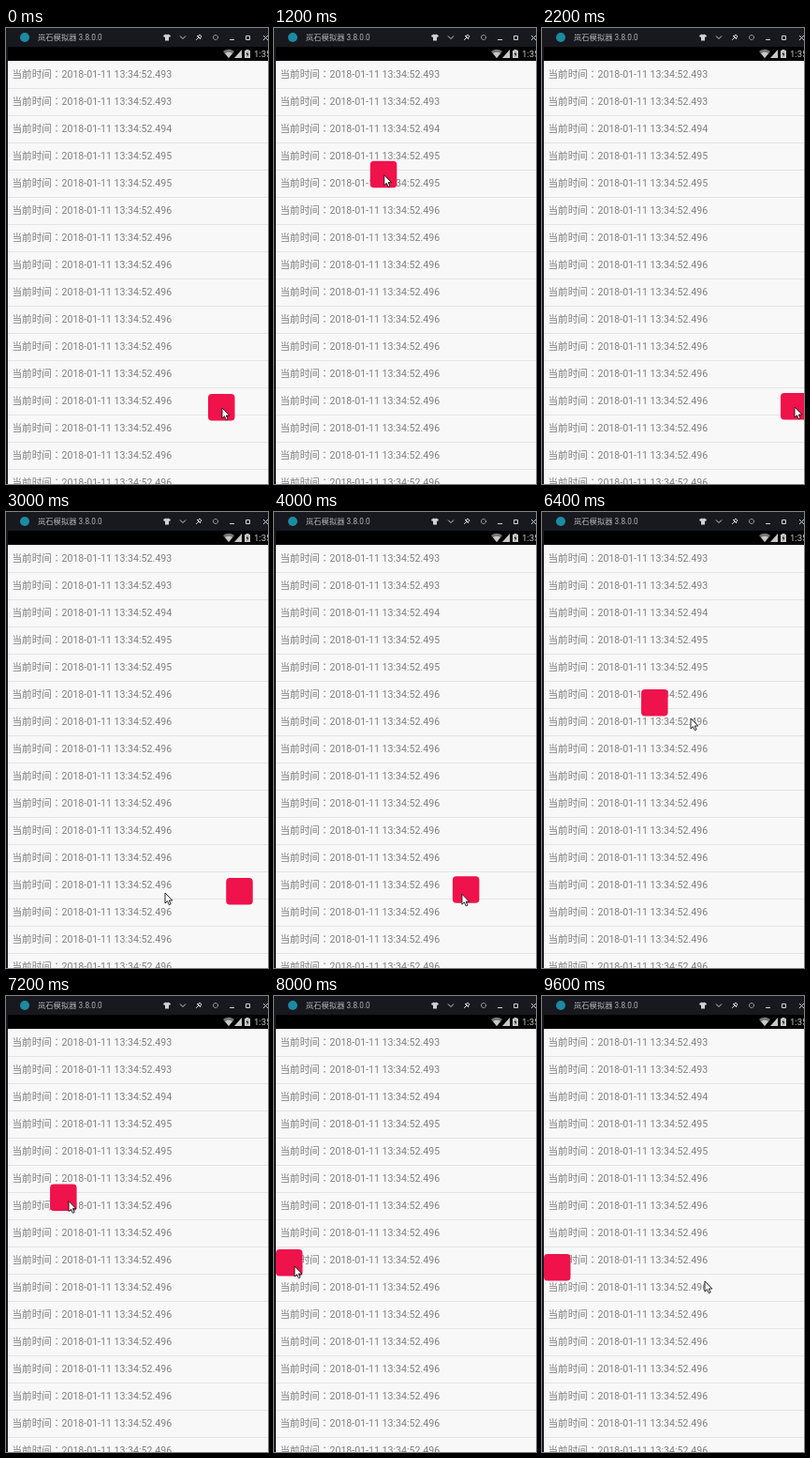
An HTML page that plays this animation: 280 px wide and 486 px high, repeating every 9800 ms.

```html
<!DOCTYPE html>
<html lang="zh-TW">
<head>
<meta charset="utf-8">
<style>
html, body { margin: 0; width: 100%; height: 100%; overflow: hidden; background: #f8f8f8; }
svg { display: block; font-family: Roboto, "Noto Sans CJK TC", "Noto Sans CJK", sans-serif; }
</style>
</head>
<body>
<svg width="280" height="486" viewBox="0 0 280 486">
  <rect width="280" height="486" fill="#f8f8f8"/>
  <g id="rows" font-size="10.6" fill="#7f7f7f"></g>
  <rect width="2" height="486" fill="#17191e"/>
  <rect width="280" height="20" fill="#17191e"/>
  <rect x="2" y="20" width="278" height="15" fill="#000"/>

  <!-- title bar -->
  <circle cx="20" cy="10" r="5" fill="#1b8ba3"/>
  <text x="34" y="13" font-size="8.3" fill="#b4b6ba">岚石模拟器 3.8.0.0</text>
  <g fill="none" stroke="#d0d2d6">
    <path d="M168 8l3-1.5 1 1 1-1 3 1.5-1 2-1-.5v4h-4v-4l-1 .5z" fill="#d0d2d6" stroke="none"/>
    <path d="M186 8.5l3 3 3-3"/>
    <path d="M203 13l3-3m-2-2l4 4m-3-3l2-2 2 2-2 2"/>
    <circle cx="224" cy="10" r="2.5" stroke-dasharray="1.3 .7"/>
    <path d="M239 12.5h5M256.500 8.500h4v4h-4zM275 8l5 5m0-5l-5 5"/>
  </g>

  <!-- status bar -->
  <g fill="#c8c8c8">
    <path d="M232 25q6-4.500 12 0l-6 7z" fill="#777"/>
    <path d="M234 27q4-2.500 8 0l-4 5z"/>
    <path d="M252 23v9h-8z"/>
    <path d="M255 24h1.500v-1h3v1h1.500v8h-6z"/>
    <path d="M258.500 25l-2 3.300h1.500l-.5 2.700 2-3.500h-1.500z" fill="#000"/>
    <text x="265" y="31" font-size="9.5">1:35</text>
  </g>

  <rect id="icon" width="28.500" height="28.500" rx="4" fill="#f0124a"/>
  <path id="cursor" d="M0 0v11l2.500-2.300 1.800 4 1.800-.8-1.800-3.900h3.500z" fill="#fff" stroke="#111" stroke-width=".9"/>
</svg>
<script>
const $ = id => document.getElementById(id);
const LOOP = 9800, STEP = 200, SNAP = 400, ROW = 29, LEFT = 2, RIGHT = 262;

let rows = '';
for (let i = 0; i < 16; i++) {
  const ms = Math.min(496, 493 + Math.floor(i / 2) + (i > 2 && i % 2) + (i > 4));
  rows += `<text x="6.5" y="${53.4 + i * ROW}">当前时间：2018-01-11 13:34:52.${ms}</text>` +
    `<rect x="2" y="${64 + i * ROW}" width="278" height="1" fill="#e4e4e4"/>`;
}
$('rows').innerHTML = rows;

// where the pointer turns or rests: time, x, y
const stops = [
  [0, 231, 405], [900, 94, 118], [2200, 270, 404], [2800, 170, 405],
  [3000, 170, 406], [3600, 272, 409], [4600, 70, 404], [5000, 66, 404],
  [5400, 18, 404], [6340, 162, 208], [6400, 159, 220], [7000, 22, 207],
  [7500, 150, 240], [8000, 22, 288], [8600, 240, 287], [9000, 100, 293],
  [9600, 174, 304], [LOOP, 174, 304]
];

// moments of grab and release, and the edge it slides to
const drags = [[0, 2800, RIGHT], [3600, 4600, LEFT], [5400, 6340, LEFT], [7000, 9000, LEFT]];

function pointer(t) {
  const i = stops.findIndex(s => s[0] > t);
  const [t0, x0, y0] = stops[i - 1], [t1, x1, y1] = stops[i];
  const k = (t - t0) / (t1 - t0), e = k * k * (3 - 2 * k);
  return [x0 + (x1 - x0) * e, y0 + (y1 - y0) * e];
}

// follows the pointer while held, then eases out to its edge
function floating(t) {
  let pos = [216, 390];
  for (const [grab, release, edge] of drags) {
    if (t < grab) break;
    const from = pointer(grab), to = pointer(Math.min(t, release));
    const left = 1 - Math.min(1, Math.max(0, t - release) / SNAP);
    const x = pos[0] + to[0] - from[0], y = pos[1] + to[1] - from[1];
    pos = [edge + (x - edge) * left * left, y];
  }
  return pos;
}

const place = (id, pos) => $(id).setAttribute('transform', `translate(${pos})`);

const start = performance.now();
function draw(now) {
  const t = Math.floor(Math.max(0, now - start) % LOOP / STEP) * STEP;
  place('icon', floating(t));
  place('cursor', pointer(t));
  requestAnimationFrame(draw);
}
draw(start);
</script>
</body>
</html>
```
